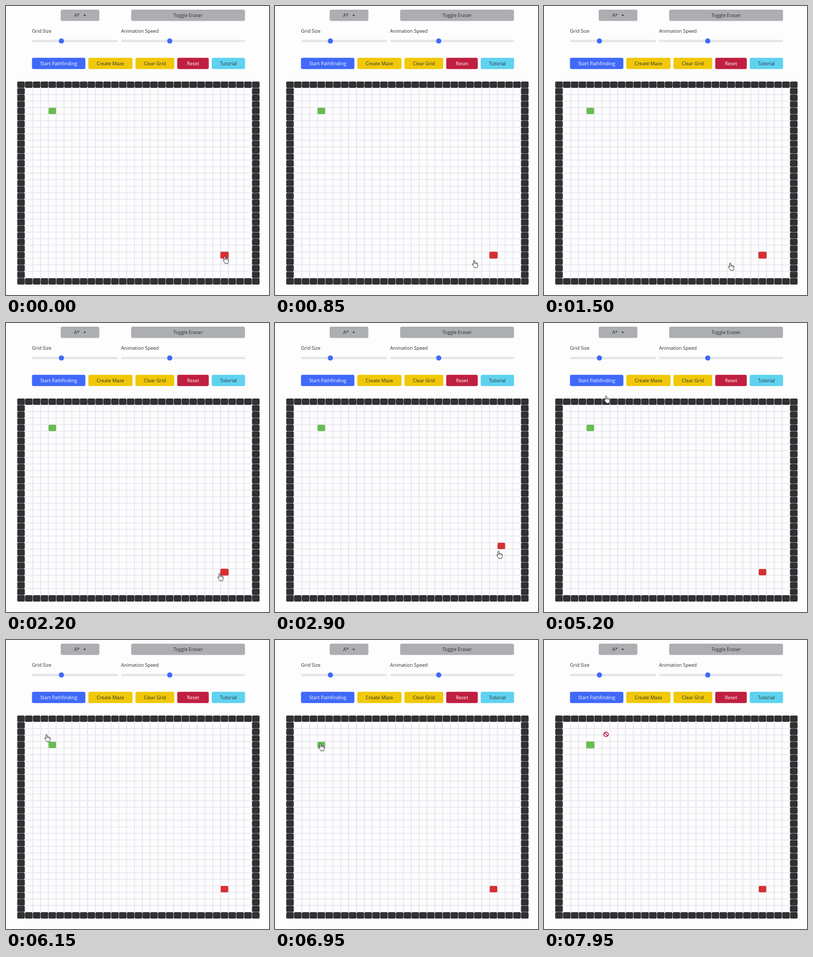
Animation, 500 px wide and 551 px high, one loop 8000 ms. Source, as an HTML page:

```html
<!DOCTYPE html>
<html>
<head>
<meta charset="utf-8">
<style>
html, body { margin: 0; width: 100%; height: 100%; overflow: hidden; background: #fdfdfe; }
svg { display: block; width: 500px; height: 551px; font: 9px "Open Sans", "Noto Sans", sans-serif; }
</style>
</head>
<body>
<svg viewBox="0 0 500 551">
  <g id="panel"></g>
  <g id="grid"></g>
  <g id="hand" fill="#fff" stroke="#222" stroke-width=".9" stroke-linejoin="round">
    <path d="M-1.2 1.2a1.2 1.2 0 0 1 2.4 0V5.2q.2-1 1.1-.9 1 .1 1.1 1.1 .2-.8 1-.7 .9 .1 1 1.1 .3-.5 .9-.3 .7 .3 .7 1.2V10q0 1.5-1 2.6V14H.4V13Q-1.5 11-3.4 8.2q-.6-1.1 .3-1.6 .8-.3 1.9 1.4Z"/>
    <path d="M1.2 5V7.5M3.4 5.3V7.7M5.4 5.8V8" stroke-width=".6"/>
  </g>
  <g id="stop" fill="#fff" stroke="#b9133c" stroke-width="1.6">
    <circle r="4.2"/><path d="M-3-3L3 3"/>
  </g>
</svg>
<script>
const $ = id => document.getElementById(id);
const panel = $('panel'), grid = $('grid'), hand = $('hand'), stop = $('stop');
const INK = '#2b2d31', BLUE = '#4069fa', GRAY = '#acaeb2', YELLOW = '#f0c808';

function add(parent, tag, attrs, text) {
  const el = document.createElementNS('http://www.w3.org/2000/svg', tag);
  for (const k in attrs) el.setAttribute(k, attrs[k]);
  if (text) el.textContent = text;
  parent.append(el);
  return el;
}
const box = (parent, x, y, width, height, rx, fill) => add(parent, 'rect', { x, y, width, height, rx, fill });
const label = (x, y, text, fill = INK, anchor = 'middle') =>
  add(panel, 'text', { x, y, fill, 'text-anchor': anchor }, text);
const place = (el, x, y, scale = 1) => el.setAttribute('transform', `translate(${x} ${y}) scale(${scale})`);

function button(x, y, w, fill, text, color, dx = 0) {
  box(panel, x, y, w, 21.5, 3, fill);
  label(x + w / 2 + dx, y + 14.2, text, color);
}
function slider(x, w, thumb, text) {
  label(x, 51.2, text, INK, 'start');
  box(panel, x, 64.5, w, 4.5, 2.2, '#e6e6ea');
  add(panel, 'circle', { cx: thumb, cy: 66.7, r: 4.9, fill: BLUE });
}

button(104, 7, 73.5, GRAY, 'A*', INK, -6);
add(panel, 'path', { d: 'M147 16.7h5.2l-2.6 2.8z', fill: INK });
button(238, 7, 216.3, GRAY, 'Toggle Eraser');
slider(49.5, 163.5, 105.3, 'Grid Size');
slider(218.7, 235.8, 311.3, 'Animation Speed');

let left = 49.4;
for (const [w, fill, text, color] of [
  [101.5, BLUE, 'Start Pathfinding', '#fff'],
  [84, YELLOW, 'Create Maze'],
  [73.8, YELLOW, 'Clear Grid'],
  [60, '#c01f40', 'Reset', '#fff'],
  [63.4, '#5fd2ef', 'Tutorial']
]) {
  button(left, 98.8, w, fill, text, color);
  left += w + 5.6;
}

// Cells are drawn around their centre so they can grow in place
const N = 31, PW = 14.88, PH = 12.5, X0 = 28.5, Y0 = 150;
const colX = col => X0 + col * PW, rowY = row => Y0 + row * PH;
function cell(col, row, fill, w = 14.3, h = 11.8) {
  const g = add(grid, 'g', {});
  box(g, -PW / 2, -5.8, PW, PH, 2, '#dcdbe1');
  box(g, -w / 2, -h / 2, w, h, 2, fill);
  place(g, colX(col), rowY(row));
  return g;
}
for (let r = 0; r < N; r++)
  for (let c = 0; c < N; c++)
    if (r % (N - 1) && c % (N - 1)) cell(c, r, '#fdfcfe', 13.7, 11.3);
    else cell(c, r, '#313134');
const home = cell(4, 4, '#67bd50');
const goal = cell(26, 26, '#d63033');

// Pointer stops: time, x, y
const GRAB = 2450, DROP = 4500, BLOCK = 7800;
const path = [
  [0, 416, 477], [1500, 354, 490], [GRAB, 416, 475], [2700, 428, 424],
  [2900, 425, 435], [3900, 411, 471], [4300, 446, 462], [DROP, 416, 475],
  [5200, 118, 139], [5500, 100, 108], [6150, 77, 180], [7200, 88, 200],
  [7750, 88, 200], [7950, 118, 180], [8000, 118, 180]
];
function pointer(t) {
  const i = path.findIndex(p => p[0] > t);
  const [t0, x0, y0] = path[i - 1], [t1, x1, y1] = path[i];
  const u = (1 - Math.cos(Math.PI * (t - t0) / (t1 - t0))) / 2;
  return [x0 + (x1 - x0) * u, y0 + (y1 - y0) * u];
}

function draw(now) {
  const t = Math.floor(now % 8000 / 50) * 50;
  const blocked = t >= BLOCK;
  hand.style.display = blocked ? 'none' : '';
  stop.style.display = blocked ? '' : 'none';
  place(blocked ? stop : hand, ...pointer(t));
  // The dragged goal snaps to cells a little behind the pointer
  const [x, y] = pointer(Math.min(DROP, Math.max(GRAB, t - 200)));
  place(goal, colX(Math.round((x - X0) / PW)), rowY(Math.round((y - Y0) / PH)), t < GRAB ? 1.1 : 1);
  place(home, colX(4), rowY(4), blocked ? 1.1 : 1);
}
const start = performance.now();
function tick() {
  draw(performance.now() - start);
  requestAnimationFrame(tick);
}
tick();
</script>
</body>
</html>
```
